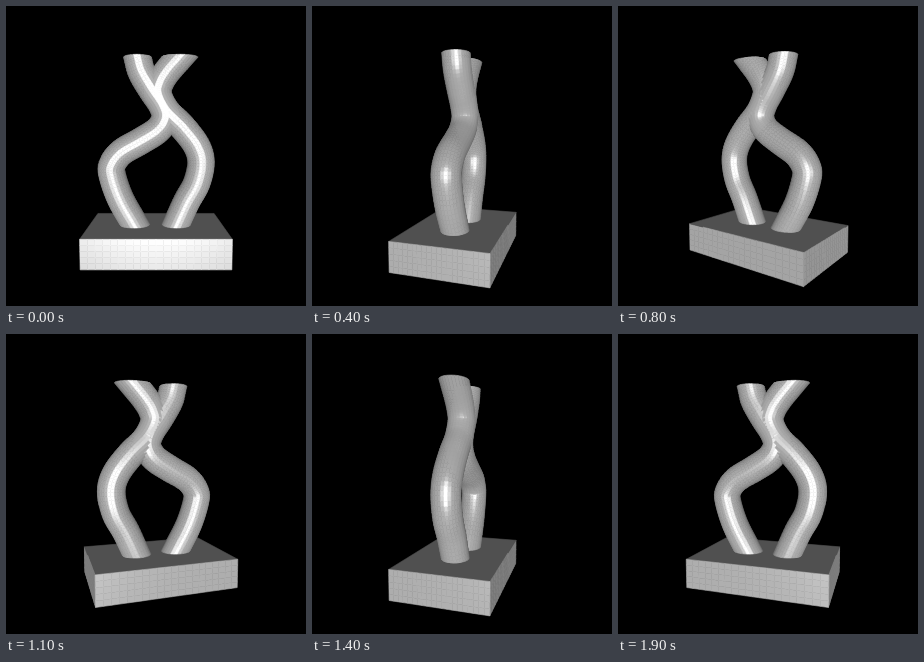
Animation of 300 by 300 pixels, one loop 2 s. Source, as an HTML page with a canvas:

```html
<!DOCTYPE html>
<html lang="en">
<head>
<meta charset="utf-8">
<title>Turning sculpture</title>
<style>
  html, body { margin: 0; width: 100%; height: 100%; overflow: hidden; background: #000; }
  canvas { display: block; width: 300px; height: 300px; }
</style>
</head>
<body>
<canvas id="stage" width="300" height="300"></canvas>
<script>
const ctx = document.getElementById('stage').getContext('2d');
const STEPS = 20, STEP_MS = 100;
const DIST = 322, PITCH = 0.0768, SIN = Math.sin(PITCH), COS = Math.cos(PITCH);
const CAMERA = [0, DIST * SIN, DIST * COS];
const LIGHT = [0, 0, 1];
const RADIUS = 13.2, SIDES = 28, CUTS = 6;
const BOX = { x: 67.1, z: 44.7, top: -70, bottom: -97.6 };

// Centre lines of the two tubes, from top to bottom, in the plane z = 0.
const TUBES = [
  [[-18, 96.5], [-14, 82], [-4, 65], [6, 50], [9, 38], [2, 26], [-15, 15],
   [-34, 4], [-43.5, -8], [-44, -19], [-36, -43], [-21.5, -69.5]],
  [[23, 96.5], [11, 83], [4, 72], [2, 61], [10, 45], [26, 29],
   [40, 11], [45, -6], [41, -27], [31, -46], [20.5, -69.5]]
];

const dot = (a, b) => a[0] * b[0] + a[1] * b[1] + a[2] * b[2];
const add = (a, b) => a.map((v, k) => v + b[k]);
const unit = v => v.map(n => n / Math.hypot(...v));

function spline(a, b, c, d, t) {
  const at = i => 0.5 * (2 * b[i] + (c[i] - a[i]) * t +
    (2 * a[i] - 5 * b[i] + 4 * c[i] - d[i]) * t * t +
    (3 * b[i] - a[i] - 3 * c[i] + d[i]) * t * t * t);
  return [at(0), at(1)];
}

function centreLine(points) {
  const extend = (end, next) => end.map((v, k) => 2 * v - next[k]);
  const n = points.length;
  const p = [extend(points[0], points[1]), ...points, extend(points[n - 1], points[n - 2])];
  const line = [];
  for (let i = 0; i < n - 1; i++)
    for (let j = 0; j < CUTS; j++)
      line.push(spline(p[i], p[i + 1], p[i + 2], p[i + 3], j / CUTS));
  line.push(points[n - 1]);
  return line;
}

function tubeQuads(points) {
  const line = centreLine(points), last = line.length - 1;
  const top = line[0][1], bottom = line[last][1];
  const sideways = line.map((p, i) => {
    const a = line[Math.max(0, i - 1)], b = line[Math.min(last, i + 1)];
    return unit([a[1] - b[1], b[0] - a[0], 0]);
  });
  const normal = (i, j) => {
    const angle = j / SIDES * 2 * Math.PI, c = Math.cos(angle);
    return [sideways[i][0] * c, sideways[i][1] * c, Math.sin(angle)];
  };
  // Both ends are cut level: points slide along the tube onto the cut.
  const vertex = (i, j) => {
    const n = normal(i, j), [sx, sy] = sideways[i];
    const y = line[i][1] + RADIUS * n[1];
    const level = i === 0 ? top : i === last ? bottom : Math.min(top, Math.max(bottom, y));
    return [line[i][0] + RADIUS * n[0] - (level - y) * sy / sx, level, RADIUS * n[2]];
  };
  const quads = [];
  for (let i = 0; i < last; i++)
    for (let j = 0; j < SIDES; j++)
      quads.push({
        points: [vertex(i, j), vertex(i, j + 1), vertex(i + 1, j + 1), vertex(i + 1, j)],
        normal: unit(add(normal(i, j + 0.5), normal(i + 1, j + 0.5)))
      });
  return quads;
}

// A wall runs from a to b, given as [x, z], and is split into cells for its shine.
function wallQuads(a, b, normal, { top, bottom }) {
  const columns = 20, rows = 5, quads = [];
  const at = (i, j) => [
    a[0] + (b[0] - a[0]) * i / columns,
    top + (bottom - top) * j / rows,
    a[1] + (b[1] - a[1]) * i / columns
  ];
  for (let i = 0; i < columns; i++)
    for (let j = 0; j < rows; j++)
      quads.push({ points: [at(i, j), at(i + 1, j), at(i + 1, j + 1), at(i, j + 1)], normal });
  return quads;
}

function boxQuads(box) {
  const { x, z, top } = box;
  return [
    { points: [[-x, top, -z], [x, top, -z], [x, top, z], [-x, top, z]], normal: [0, 1, 0] },
    ...wallQuads([-x, z], [x, z], [0, 0, 1], box),
    ...wallQuads([x, -z], [-x, -z], [0, 0, -1], box),
    ...wallQuads([x, z], [x, -z], [1, 0, 0], box),
    ...wallQuads([-x, -z], [-x, z], [-1, 0, 0], box)
  ];
}

function project([x, y, z]) {
  const scale = DIST / (DIST - z * COS - y * SIN);
  return [150 + x * scale, 150 - (y * COS - z * SIN) * scale];
}

function shade(normal, toCamera) {
  const half = unit(add(LIGHT, unit(toCamera)));
  const diffuse = Math.max(0, dot(normal, LIGHT)) ** 0.6;
  const shine = Math.max(0, dot(normal, half)) ** 44;
  return Math.min(255, Math.round(80 + 95 * diffuse + 150 * shine));
}

function drawQuads(quads, angle) {
  const c = Math.cos(angle), s = Math.sin(angle);
  const turn = ([x, y, z]) => [x * c + z * s, y, z * c - x * s];
  const visible = [];
  for (const quad of quads) {
    const points = quad.points.map(turn), normal = turn(quad.normal);
    const middle = points.reduce(add).map(v => v / 4);
    const toCamera = CAMERA.map((v, k) => v - middle[k]);
    if (dot(normal, toCamera) > 0)
      visible.push({ points, far: Math.hypot(...toCamera), grey: shade(normal, toCamera) });
  }
  visible.sort((a, b) => b.far - a.far);
  for (const { points, grey } of visible) {
    ctx.fillStyle = ctx.strokeStyle = `rgb(${grey},${grey},${grey})`;
    ctx.beginPath();
    for (const p of points) ctx.lineTo(...project(p));
    ctx.closePath();
    ctx.fill();
    ctx.stroke();
  }
}

const base = boxQuads(BOX);
const tubes = TUBES.flatMap(tubeQuads);
ctx.lineWidth = 0.6;
ctx.lineJoin = 'round';

function draw(step) {
  const angle = step / STEPS * 2 * Math.PI;
  ctx.fillStyle = '#000';
  ctx.fillRect(0, 0, 300, 300);
  drawQuads(base, angle);
  drawQuads(tubes, angle);
}

const start = performance.now();
let shown = -1;
function tick() {
  const step = Math.floor((performance.now() - start) / STEP_MS) % STEPS;
  if (step !== shown) draw(shown = step);
  requestAnimationFrame(tick);
}
tick();
</script>
</body>
</html>
```
